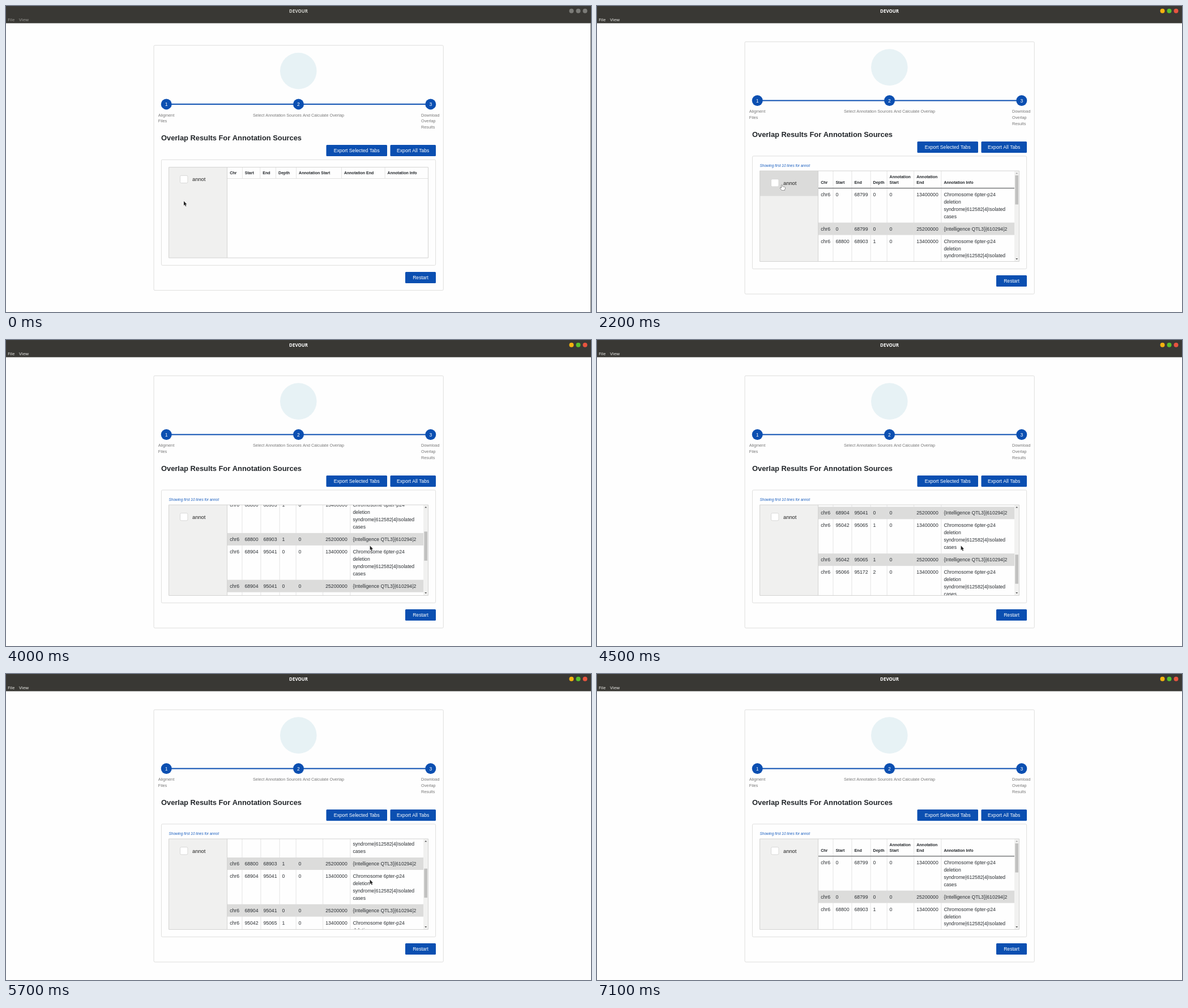
Animation of 1033 by 542 pixels, one loop 8.9 s. Source, as an HTML page with a canvas:

```html
<!DOCTYPE html>
<html lang="en">
<head>
<meta charset="utf-8">
<title>Overlap results</title>
<style>
  html, body { margin: 0; width: 100%; height: 100%; overflow: hidden; background: #fefefe; }
  canvas { display: block; }
</style>
</head>
<body>
<canvas width="1033" height="542"></canvas>
<script>
const ctx = document.querySelector('canvas').getContext('2d');
const LOOP = 8900, STEP = 100;
const FOCUS_AT = 1700, RESULTS_AT = 2200, CURSOR_GONE_AT = 7100;
const SHIFT = 6.4;            // half of the card's growth when results arrive
const BLUE = '#0b4fb1', LINE = '#dededd', STRIPE = '#dcdcdb', INK = '#2b2f33', DARK = '#212529';
const SANS = '"Liberation Sans", Arial, sans-serif';
const UI = '"Noto Sans", sans-serif';

// Smooth progress from 0 to 1 between two times.
function ease(t, from, to) {
  const u = Math.min(1, Math.max(0, (t - from) / (to - from)));
  return u * u * (3 - 2 * u);
}

function cursorAt(t) {
  const moves = [
    { from: 0, to: 500, x: 390, y: 295 },
    { from: 500, to: 900, x: 309, y: 319 },
    { from: 900, to: 1300, x: 326.5, y: 316.5 },
    { from: 2600, to: 3500, x: 642.7, y: 364.3 },
    { from: 6800, to: CURSOR_GONE_AT, x: 1033, y: 284 },
  ];
  let x = 314, y = 345.5;
  for (const m of moves) {
    const u = ease(t, m.from, m.to);
    x += (m.x - x) * u;
    y += (m.y - y) * u;
  }
  return [x, y];
}
const hoverAt = t => ease(t, 200, 500) - ease(t, 2900, 3200);
const scrollAt = t => 249 * ease(t, 3600, 4400) + 46.5 * ease(t, 4400, 4900)
  - 230 * ease(t, 5380, 5900) - 65.5 * ease(t, 6000, 6300);

// Text is placed by the vertical centre of its capitals.
function text(str, x, y, size, color = INK, style = '', align = 'left', family = SANS) {
  ctx.font = `${style} ${size}px ${family}`;
  ctx.textAlign = align;
  ctx.fillStyle = color;
  ctx.fillText(str, x, y + size * 0.36);
}
function rect(x, y, w, h, color) {
  ctx.fillStyle = color;
  ctx.fillRect(x, y, w, h);
}
function circle(x, y, r, color) {
  ctx.fillStyle = color;
  ctx.beginPath();
  ctx.arc(x, y, r, 0, 7);
  ctx.fill();
}
function box(x, y, w, h, r, fill, stroke) {
  ctx.beginPath();
  ctx.roundRect(x, y, w, h, r);
  if (fill) { ctx.fillStyle = fill; ctx.fill(); }
  if (stroke) { ctx.strokeStyle = stroke; ctx.lineWidth = 1; ctx.stroke(); }
}
function button(label, left, right, y) {
  y = Math.round(y);
  box(left, y, right - left, 20, 1.5, BLUE);
  text(label, (left + right) / 2, y + 9.8, 8.6, '#fff', '', 'center');
}

function titleBar(focused) {
  rect(0, 0, 1033, 30.5, '#393834');
  text('DEVOUR', 516.5, 8.7, 7.9, focused ? '#fff' : '#d0d0cb', 'bold', 'center', UI);
  const menu = focused ? '#e9e9e5' : '#979792';
  text('File', 3, 24, 7.8, menu, '', 'left', UI);
  text('View', 23, 24, 7.8, menu, '', 'left', UI);
  ['#f5b20f', '#56c22d', '#e8543f'].forEach((color, i) =>
    circle(998.5 + i * 12, 8.7, 4, focused ? color : '#7b7b77'));
  if (!focused) rect(1032, 30, 1, 512, '#777774');
}

function cardTop(dy) {
  circle(516.3, 115 - dy, 32.3, '#e7f2f5');
  const y = 173.9 - dy;
  rect(283, y - 1, 467, 2, BLUE);
  for (let i = 0; i < 3; i++) {
    const x = 283.2 + i * 233.3;
    circle(x, y, 9.5, BLUE);
    text(i + 1, x, y, 8.6, '#fff', '', 'center');
  }
  const label = (x, ...lines) =>
    lines.forEach((s, i) => text(s, x, 193 + i * 10.8 - dy, 7.3, '#777'));
  label(268.8, 'Aligment', 'Files');
  label(436, 'Select Annotation Sources And Calculate Overlap');
  label(733, 'Download', 'Overlap', 'Results');
  text('Overlap Results For Annotation Sources', 274, 233.8 - dy, 12.87, DARK, 'bold');
  button('Export Selected Tabs', 565.5, 673, 246.2 - dy);
  button('Export All Tabs', 678.5, 759, 246.2 - dy);
}

function sidebar(dy, hover) {
  const top = 285.6 + dy;
  rect(287.5, top, 103, 160.5, '#f0f0ef');
  ctx.globalAlpha = hover;
  rect(287.5, top, 103, 44.5, '#dbdbda');
  ctx.globalAlpha = 1;
  box(307.5, top + 14.7, 13.4, 13.2, 2, '#fff', '#d8d8d7');
  text('annot', 329, top + 21.4, 9.35, '#222');
}

const HEADERS = ['Chr', 'Start', 'End', 'Depth', 'Annotation Start', 'Annotation End', 'Annotation Info'];
const EMPTY_EDGES = [390.6, 417.2, 448.7, 476.5, 512.5, 592.3, 669];
const RESULT_EDGES = [390.6, 416.8, 449.8, 483, 512, 559.6, 607.8];
const CELL_PAD = 4.6;

const header = (str, edge, y) => text(str, edge + CELL_PAD, y, 7.05, DARK, 'bold');
const dividers = (edges, y, h) => edges.slice(1).forEach(x => rect(x - 0.3, y, 0.8, h, LINE));

function emptyTable() {
  HEADERS.forEach((s, i) => header(s, EMPTY_EDGES[i], 295.7));
  dividers(EMPTY_EDGES, 286, 19.5);
  rect(390.5, 305, 355, 0.9, LINE);
}

const RANGE_ENDS = [68799, 68903, 95041, 95065, 95172], DEPTHS = [0, 1, 0, 1, 2];
const SYNDROME = ['Chromosome 6pter-p24', 'deletion', 'syndrome|612582|4|Isolated', 'cases'];
const QTL = ['{Intelligence QTL3}|610294|2'];
const TABLE_TOP = 292, ROWS_TOP = 322.8, TALL = 60.8, SHORT = 22, PAIR = TALL + SHORT;

function resultRow(y, cells, info) {
  const put = (s, column, line = 0) =>
    text(s, RESULT_EDGES[column] + CELL_PAD, y + 10.9 + line * 12.9, 8.67);
  cells.forEach((s, column) => put(s, column));
  info.forEach((s, line) => put(s, cells.length, line));
}

function resultTable(scroll) {
  ctx.save();
  ctx.beginPath();
  ctx.rect(390.5, TABLE_TOP, 346.5, 160.3);
  ctx.clip();
  ctx.translate(0, -scroll);
  HEADERS.forEach((s, i) => {
    const lines = i === 6 ? [s] : s.split(' ').reverse();
    lines.forEach((word, row) => header(word, RESULT_EDGES[i], 312.4 - row * 10.3));
  });
  RANGE_ENDS.forEach((end, i) => {
    const y = ROWS_TOP + i * PAIR, start = i ? RANGE_ENDS[i - 1] + 1 : 0;
    const cells = ['chr6', start, end, DEPTHS[i], 0];
    resultRow(y, [...cells, 13400000], SYNDROME);
    rect(390.5, y + TALL, 347, SHORT, STRIPE);
    resultRow(y + TALL, [...cells, 25200000], QTL);
  });
  dividers(RESULT_EDGES, TABLE_TOP, ROWS_TOP - TABLE_TOP + RANGE_ENDS.length * PAIR);
  rect(390.5, 321.9, 347, 1.5, '#77797b');
  ctx.restore();
  scrollbar(scroll);
}

function scrollbar(scroll) {
  rect(737, TABLE_TOP, 8.5, 160.3, '#f1f1f0');
  rect(738.4, 300 + scroll * 0.316, 5.6, 51.5, '#c1c1c0');
  const arrow = (y, dir, color) => {
    ctx.fillStyle = color;
    ctx.beginPath();
    ctx.moveTo(739.2, y);
    ctx.lineTo(743.2, y);
    ctx.lineTo(741.2, y + 2.3 * dir);
    ctx.fill();
  };
  arrow(297.3, -1, scroll > 0.5 ? '#505050' : '#a5a5a4');
  arrow(447, 1, '#505050');
}

const ARROW = new Path2D('M0 .3V7.8L1.7 6.3 3 9.3 4.3 8.7 3 5.9 5.2 5.7Z');
const HAND = new Path2D('M-.8 .6Q0-.5 .8 .6L1 3.6 4.8 4.3 5.8 5.2 4.6 10H-.2L-3.2 5.8-2.6 5-.8 6.2Z');

function cursor(x, y, hand) {
  const path = hand ? HAND : ARROW;
  ctx.save();
  ctx.translate(x, y);
  ctx.lineWidth = 1;
  ctx.lineJoin = 'round';
  ctx.strokeStyle = hand ? '#3a3a3a' : '#e4e4e4';
  ctx.stroke(path);
  ctx.fillStyle = hand ? '#fff' : '#222';
  ctx.fill(path);
  ctx.restore();
}

function draw(t) {
  const results = t >= RESULTS_AT, dy = results ? SHIFT : 0;
  rect(0, 0, 1033, 542, '#fefefe');
  titleBar(t >= FOCUS_AT);
  box(261, 69.7 - dy, 511.3, 434 + 2 * dy, 2, null, LINE);
  cardTop(dy);
  box(274.4, 272.2 - dy, 484.2, 187.1 + 2 * dy, 2, null, LINE);
  if (results) text('Showing first 10 lines for annot', 287.5, 282.8, 6.47, '#1a5fbf', 'italic');
  sidebar(dy, hoverAt(t));
  if (results) resultTable(scrollAt(t));
  else emptyTable();
  rect(390, 285.6 + dy, 0.9, 160.5, '#d0d0cf');
  box(287.5, 285.6 + dy, 458, 160.5, 0, null, '#d3d3d2');
  button('Restart', 705, 759, 470.6 + dy);
  if (t < CURSOR_GONE_AT) {
    const [x, y] = cursorAt(t);
    cursor(x, y, x < 390 && y < 330 + dy);
  }
}

const began = performance.now();
function frame() {
  const t = (performance.now() - began) % LOOP;
  draw(Math.floor(t / STEP) * STEP);
  requestAnimationFrame(frame);
}
frame();
</script>
</body>
</html>
```
